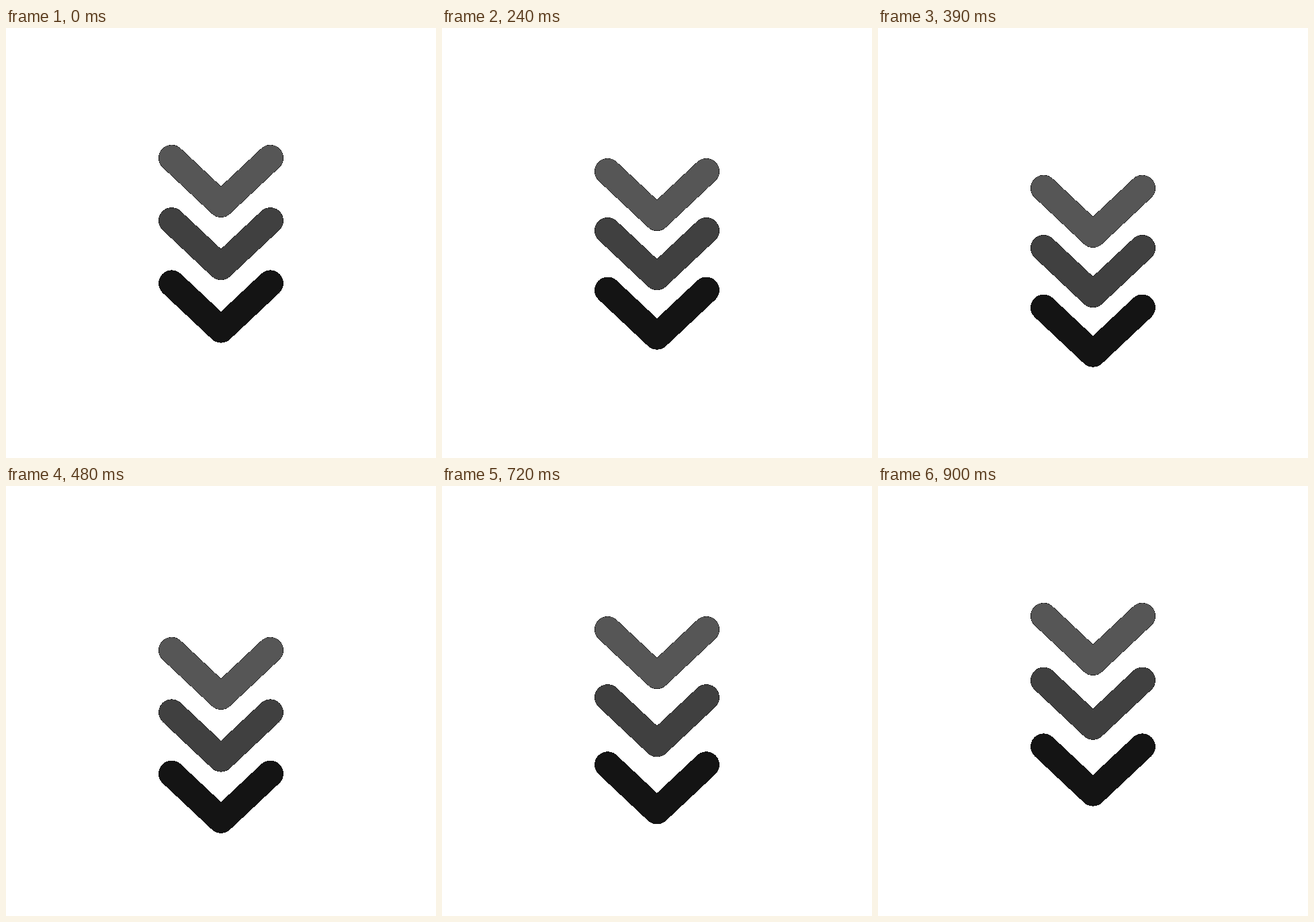
Animation of 640x640 px, one loop 930 ms. Source, as an HTML page:

```html
<!DOCTYPE html>
<html lang="en">
<head>
<meta charset="utf-8">
<title>Scroll down chevrons</title>
<style>
  html, body { margin: 0; width: 100%; height: 100%; overflow: hidden; background: #fff; }
  svg { display: block; width: 100%; height: 100%; }
  path { fill: none; stroke-linecap: round; stroke-linejoin: round; shape-rendering: crispEdges; }
  .rim { stroke: #1c1c1c; stroke-width: 39.2; }
  .body { stroke: currentColor; stroke-width: 38; }
</style>
</head>
<body>
<svg viewBox="0 0 640 640">
  <defs>
    <g id="chevron">
      <path class="rim" d="M246.6 193.4 320 262.4 393.4 193.4"/>
      <path class="body" d="M246.6 193.4 320 262.4 393.4 193.4"/>
    </g>
  </defs>
  <use href="#chevron" color="#565656"/>
  <use href="#chevron" color="#404040"/>
  <use href="#chevron" color="#141414"/>
</svg>
<script>
  const LOOP = 930, STEP = 30, SPACING = 93.3, TRAVEL = 51;
  const chevrons = document.querySelectorAll('use');

  // Smooth 0 to 1 ramp between two times
  function ramp(time, start, end) {
    const u = Math.min(1, Math.max(0, (time - start) / (end - start)));
    return u * u * (3 - 2 * u);
  }

  function draw() {
    const time = Math.floor(performance.now() % LOOP / STEP) * STEP;
    chevrons.forEach((chevron, i) => {
      const start = 60 + 30 * i, peak = start + 420, end = 900 + 60 * i;
      const drop = TRAVEL * (ramp(time, start, peak) - ramp(time, peak, end));
      chevron.setAttribute('transform', `translate(0 ${SPACING * i + drop})`);
    });
    requestAnimationFrame(draw);
  }
  draw();
</script>
</body>
</html>
```
